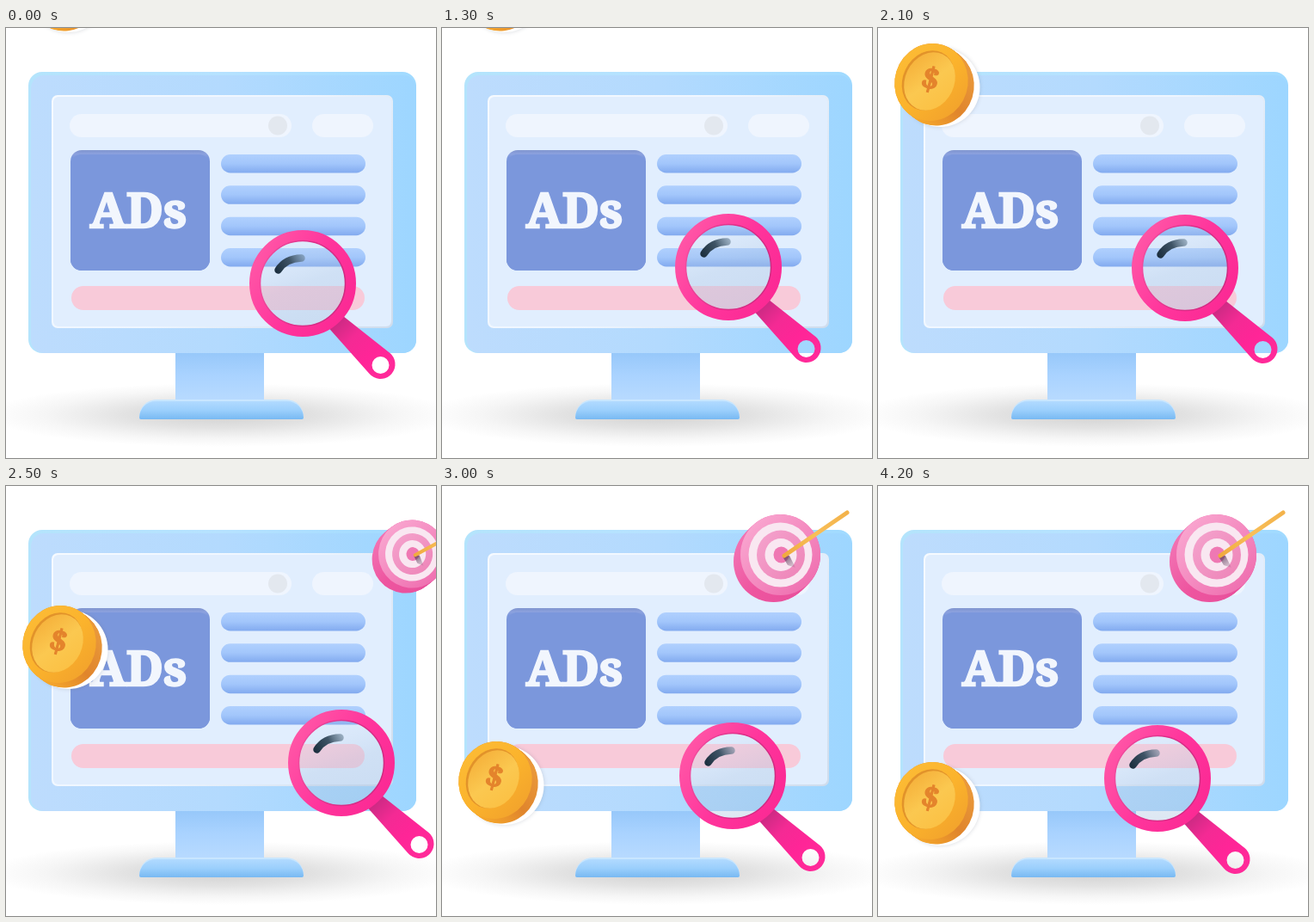
Recreate the animation shown at these times as an HTML page with a canvas. Size 500x500 px, loop 5000 ms.

```html
<!DOCTYPE html>
<html lang="en">
<head>
<meta charset="utf-8">
<title>Ads monitor</title>
<style>
html, body { margin: 0; width: 100%; height: 100%; overflow: hidden; background: #fff; }
canvas { display: block; width: 500px; height: 500px; }
</style>
</head>
<body>
<canvas id="stage" width="500" height="500"></canvas>
<script>
const ctx = document.getElementById('stage').getContext('2d');
const LOOP = 5000, STEP = 100, TAU = Math.PI * 2;
const SERIF = '"Noto Serif", "Liberation Serif", serif';

// Tracks: [time, value] pairs, joined by a monotone cubic
const lensX = [[900, 345], [1000, 344], [1700, 320], [2100, 357], [2500, 390], [3000, 338], [3400, 325]];
const lensY = [[900, 297], [1000, 295], [1700, 259], [2100, 279], [2500, 322], [3000, 337], [3400, 340]];
const coinY = [[1700, -110], [2100, 0], [2500, 121], [3000, 279], [3200, 303]];
const targetX = [[2200, 165], [2500, 79], [2800, 14], [3000, 0]];

function at(keys, t) {
  const last = keys.length - 1;
  if (t <= keys[0][0]) return keys[0][1];
  if (t >= keys[last][0]) return keys[last][1];
  const slope = i => (keys[i + 1][1] - keys[i][1]) / (keys[i + 1][0] - keys[i][0]);
  const tangent = i => {
    if (i === 0 || i === last) return 0;
    const a = slope(i - 1), b = slope(i);
    return a * b > 0 ? 2 * a * b / (a + b) : 0;
  };
  let i = 0;
  while (t > keys[i + 1][0]) i++;
  const h = keys[i + 1][0] - keys[i][0], u = (t - keys[i][0]) / h;
  const u2 = u * u, u3 = u2 * u, s = 3 * u2 - 2 * u3;
  return keys[i][1] * (1 - s) + keys[i + 1][1] * s +
    h * ((u3 - 2 * u2 + u) * tangent(i) + (u3 - u2) * tangent(i + 1));
}

function grad(x0, y0, x1, y1, ...colors) {
  const g = ctx.createLinearGradient(x0, y0, x1, y1);
  colors.forEach((c, i) => g.addColorStop(i / (colors.length - 1), c));
  return g;
}

function box(x0, y0, x1, y1, r, fill) {
  ctx.beginPath();
  ctx.roundRect(x0, y0, x1 - x0, y1 - y0, r);
  ctx.fillStyle = fill;
  ctx.fill();
}

function oval(x, y, rx, ry, tilt, fill) {
  ctx.beginPath();
  ctx.ellipse(x, y, rx, ry, tilt, 0, TAU);
  ctx.fillStyle = fill;
  ctx.fill();
}

// Thick disc: the same ellipse swept along (dx, dy)
function slab(x, y, rx, ry, tilt, dx, dy, fill) {
  for (let i = 0; i <= 12; i++) oval(x + dx * i / 12, y + dy * i / 12, rx, ry, tilt, fill);
}

function floorShadow() {
  ctx.save();
  ctx.translate(250, 450);
  ctx.scale(1, 0.135);
  const g = ctx.createRadialGradient(0, 0, 0, 0, 0, 275);
  g.addColorStop(0, 'rgba(70,70,70,.25)');
  g.addColorStop(0.4, 'rgba(75,75,75,.16)');
  g.addColorStop(0.75, 'rgba(90,90,90,.055)');
  g.addColorStop(1, 'rgba(100,100,100,0)');
  ctx.fillStyle = g;
  ctx.fillRect(-275, -275, 550, 550);
  ctx.restore();
}

function stand() {
  box(197, 374, 300, 434, 0, grad(0, 378, 0, 432, '#97c8fa', '#aad3ff', '#b7daff'));
  box(155, 432, 346, 455, [20, 20, 2, 2], '#c8e6ff');
  box(155, 434, 346, 455, [20, 20, 2, 2], grad(0, 434, 0, 455, '#b1daff', '#9bcffc', '#78b9f2'));
}

function monitor() {
  box(26, 51, 477, 378, 16, grad(26, 0, 477, 0, '#b4e4fc', '#b6e2ff', '#a0daff'));
  box(29, 55, 477, 378, 15, grad(29, 0, 477, 0, '#bddcfd', '#b3dafe', '#9dd6ff'));
  box(53, 78, 450, 349, 7, grad(53, 78, 450, 349, '#f6faff', '#eef6ff', '#cfdcec'));
  box(55, 80, 448, 347, 6, '#e1eefe');

  box(74, 100, 332, 127, 13.5, '#eff5fe');
  oval(316, 113.5, 11, 11, 0, '#e3e8ef');
  box(356, 100, 427, 127, 13.5, '#eff5fe');

  box(75, 142, 237, 282, 13, grad(0, 142, 0, 151, '#8095cf', '#8ba1de', '#7b97dc'));
  box(75, 147, 237, 282, 13, '#7b97dc');
  adText();

  [147, 183.3, 219.7, 256].forEach(y =>
    box(250, y, 418, y + 21.5, 10.7, grad(0, y, 0, y + 21.5, '#b0d0fe', '#a2c6fb', '#82aaef')));
  box(76, 300, 417, 328, 14, '#f8cad9');
}

function adText() {
  ctx.font = 'bold 56px ' + SERIF;
  ctx.textAlign = 'center';
  ctx.textBaseline = 'alphabetic';
  ctx.lineJoin = 'miter';
  ctx.miterLimit = 3;
  ctx.lineWidth = 2.4;
  ctx.fillStyle = ctx.strokeStyle = '#f2f6fd';
  ctx.fillText('ADs', 154, 231.5);
  ctx.strokeText('ADs', 154, 231.5);
}

function coin(y) {
  const tilt = 0.3;
  ctx.save();
  ctx.translate(0, y);
  ctx.shadowColor = 'rgba(90,100,120,.25)';
  ctx.shadowBlur = 5;
  oval(72.5, 69, 46, 46, 0, '#fff');
  ctx.shadowColor = 'transparent';
  slab(62, 63, 42.5, 45.3, tilt, 7, 5.5, grad(50, 114, 112, 55, '#f6a82b', '#e0852c', '#e9983a'));
  oval(62, 63, 42.5, 45.3, tilt, grad(28, 30, 95, 100, '#fcbb35', '#fbb32c', '#f2a22c'));
  oval(58.5, 61, 29.5, 36, 0.45, '#e2932a');
  oval(60, 62, 28.5, 35, 0.45, grad(38, 35, 80, 92, '#f5b03a', '#fbc850', '#fbc043'));
  ctx.translate(61, 59.5);
  ctx.rotate(0.25);
  ctx.font = 'bold 36px ' + SERIF;
  ctx.textAlign = 'center';
  ctx.lineWidth = 1.2;
  ctx.fillStyle = ctx.strokeStyle = '#e4842c';
  ctx.fillText('$', 0, 12.5);
  ctx.strokeText('$', 0, 12.5);
  ctx.restore();
}

function target(dx) {
  const size = 1 - dx * 0.002;
  ctx.save();
  ctx.translate(389.5 + dx, 84 - dx * 0.025);
  ctx.rotate(dx * 0.0013);
  ctx.scale(size, size);
  ctx.translate(-389.5, -84);
  slab(393.5, 80, 46.5, 47, 0, -8, 8, grad(340, 70, 415, 135, '#f272b3', '#ee559f', '#e8509c'));
  oval(393.5, 80, 46.5, 47, 0, grad(358, 45, 430, 115, '#f9a5cf', '#f48bc0', '#ef6fb0'));
  oval(393.5, 80, 37, 37.5, 0, '#f9e7f1');
  oval(394, 80, 28, 28.5, 0, grad(370, 60, 418, 102, '#f4a0cb', '#ee86b9'));
  oval(394, 80, 18.5, 19, 0, '#f9e7f1');
  oval(394.5, 80, 9, 9.5, 0, '#ef78b3');

  ctx.beginPath();
  ctx.moveTo(396, 82);
  ctx.lineTo(404, 81);
  ctx.lineTo(411, 95);
  ctx.lineTo(402, 92);
  ctx.closePath();
  ctx.fillStyle = grad(397, 81, 409, 96, 'rgba(80,60,85,.85)', 'rgba(130,90,120,.15)');
  ctx.fill();

  ctx.lineCap = 'round';
  ctx.lineWidth = 5;
  ctx.strokeStyle = grad(397, 81, 473, 31, '#f0aa3e', '#f8bf59', '#f3b24a');
  ctx.beginPath();
  ctx.moveTo(398, 81);
  ctx.lineTo(471, 31);
  ctx.stroke();
  ctx.restore();
}

function lens(x, y) {
  ctx.save();
  ctx.translate(x, y);

  // handle with an open hole
  ctx.beginPath();
  ctx.moveTo(26, 47);
  ctx.lineTo(77.5, 105);
  ctx.arc(90.5, 94, 17, 2.44, -0.87, true);
  ctx.lineTo(42, 34);
  ctx.closePath();
  ctx.moveTo(100.5, 95);
  ctx.arc(90.5, 95, 10, 0, TAU);
  ctx.fillStyle = grad(40, 42, 98, 102, '#c92a82', '#f42a94', '#ff2597', '#ff2a99');
  ctx.fill('evenodd');

  oval(0, 0, 50, 50, 0, grad(-15, -48, 18, 48, 'rgba(205,222,242,.15)', 'rgba(170,195,225,.32)', 'rgba(165,192,222,.38)'));

  ctx.lineCap = 'round';
  ctx.lineWidth = 8.5;
  ctx.strokeStyle = grad(-30, -13, 5, -30, '#1d3040', '#3f5466', 'rgba(110,135,155,.5)');
  ctx.beginPath();
  ctx.moveTo(-28.5, -15.5);
  ctx.quadraticCurveTo(-20, -29, -1.5, -29.5);
  ctx.stroke();

  ctx.lineWidth = 12.5;
  ctx.strokeStyle = grad(-55, -30, 55, 35, '#ff55a6', '#ff359c', '#fb2994');
  ctx.beginPath();
  ctx.arc(0, 0, 55.75, 0, TAU);
  ctx.stroke();
  ctx.lineWidth = 1.5;
  ctx.strokeStyle = grad(-50, 0, 50, 20, '#f04a9c', '#dd2c87', '#cd2a80');
  ctx.beginPath();
  ctx.arc(0, 0, 49.5, 0, TAU);
  ctx.stroke();
  ctx.restore();
}

function draw(now) {
  const t = Math.floor((now % LOOP) / STEP) * STEP;
  ctx.fillStyle = '#fff';
  ctx.fillRect(0, 0, 500, 500);
  floorShadow();
  stand();
  monitor();
  coin(at(coinY, t));
  if (t >= 2200) target(at(targetX, t));
  lens(at(lensX, t), at(lensY, t));
}

const start = performance.now();
function tick() {
  draw(performance.now() - start);
  requestAnimationFrame(tick);
}
tick();
</script>
</body>
</html>
```
